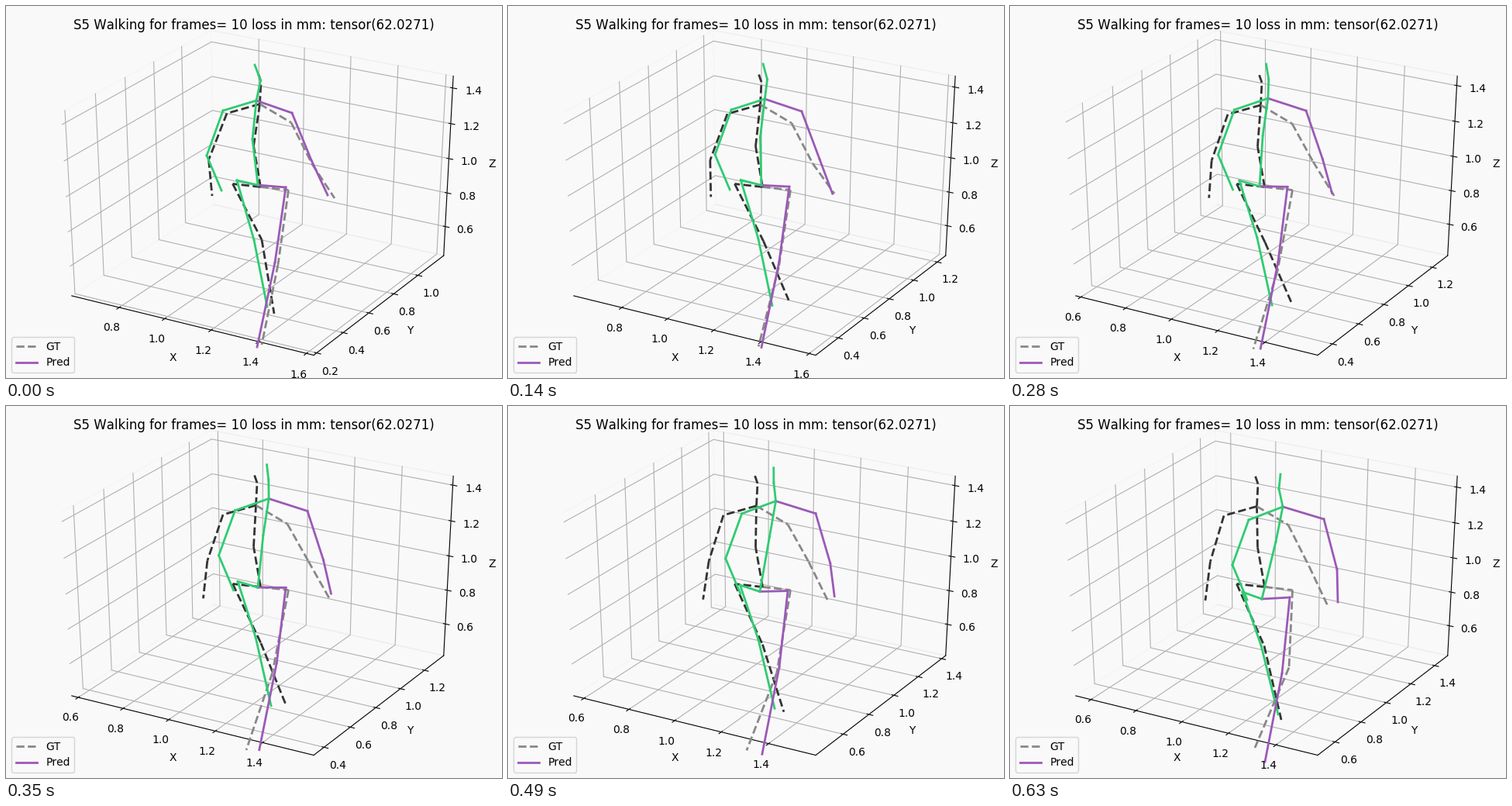
Write a matplotlib script that moves like this. It is 640 px wide and 480 px high and loops after 700 ms.

```python
import numpy as np
import matplotlib.pyplot as plt
from matplotlib.animation import FuncAnimation

W, H, FRAMES = 640, 480, 10
BG = "#f9f9f9"
DARK, GREY, GREEN, PURPLE = "#333333", "#888888", "#2ecc71", "#9b59b6"
TITLE = "S5 Walking for frames= 10 loss in mm: tensor(62.0271)"

# Camera: azimuth -60, elevation 30, distance 10, around a unit cube
AZ, EL, DIST = np.radians(-60), np.radians(30), 10
RIGHT = np.array([-np.sin(AZ), np.cos(AZ), 0])
NEAR = np.array([np.cos(AZ) * np.cos(EL), np.sin(AZ) * np.cos(EL), np.sin(EL)])
UP = np.cross(NEAR, RIGHT)

E = 0.5 + 1 / 48                      # half size of the drawn box
BACK = np.array([-E, E, -E])          # corner shared by the three panes
EDGES = np.array([[0, -E, -E], [E, 0, -E], [E, E, 0]])
TICK_DIR = (1, 0, 0)
PAD_UNIT = 48 / (72 * (6.4 + 4.8)) / 12
TICK_PAD, NAME_PAD = 11.5 * PAD_UNIT, 25 * PAD_UNIT

# Each chain runs from parent to child; 0 and 1 pick the side's colour
CHAINS = [
    ("root hip_r knee_r foot_r", 0),
    ("root hip_l knee_l foot_l", 1),
    ("root spine chest neck head", 0),
    ("chest arm_l elbow_l hand_l", 1),
    ("chest arm_r elbow_r hand_r", 0),
]

# First pose relative to the pelvis, in pixels, and how far joints drift
# over the loop; unlisted joints lean with the upper body
TRUE_START = dict(
    root=(0, 0), hip_r=(-36, -4), knee_r=(1.5, 68), foot_r=(17.5, 163.5),
    hip_l=(36, 4), knee_l=(22.5, 100), foot_l=(1.5, 203.5),
    spine=(-9, -53), chest=(-1, -107), neck=(0.5, -136), head=(-4, -149),
    arm_l=(39.5, -83), elbow_l=(66.5, -29.5), hand_l=(95.5, 14.5),
    arm_r=(-43.5, -95), elbow_r=(-67, -35), hand_r=(-62.5, 11.5))
TRUE_LEAN = (-9, 3)
TRUE_DRIFT = dict(
    root=(0, 0), hip_r=(0, 0), hip_l=(0, 0), spine=(0, 2),
    knee_r=(-2, 8), foot_r=(4, 8), knee_l=(9, 4), foot_l=(-14, 4),
    elbow_r=(-3, 2), hand_r=(-14, 6), hand_l=(-13, 12))

PRED_START = dict(
    root=(0, 0), hip_r=(-27, -6), knee_r=(-5, 71), foot_r=(12, 157),
    hip_l=(36, 3), knee_l=(22, 100), foot_l=(-1, 209),
    spine=(-7, -59), chest=(-2, -109), neck=(3.5, -135), head=(-4, -155),
    arm_l=(44, -93), elbow_l=(69, -32), hand_l=(90, 13),
    arm_r=(-45, -96), elbow_r=(-66, -38), hand_r=(-47, 7))
PRED_LEAN = (28, -6)
PRED_DRIFT = dict(
    root=(0, 0), hip_r=(2, -3), hip_l=(0, -5), knee_r=(4, -11),
    foot_r=(9, -8), knee_l=(4, -4), foot_l=(5, 1), spine=(25, -15),
    chest=(29, -10), neck=(18.5, -7), arm_l=(36, -10), hand_l=(8, -9))

# Extra swing out and back, peaking early or late in the loop
EARLY, LATE = 0.6, 1.6
SWING = dict(
    foot_r=(EARLY, 16, -20), hand_l=(EARLY, 0, -9),
    knee_l=(LATE, -13, 9), foot_l=(LATE, -13, 5),
    elbow_l=(LATE, 0, -6), hand_r=(LATE, -4, 0))


def view_center(i):
    return (1.109 - 0.0007 * i**2,
            0.699 + 0.0245 * i + 0.00089 * i**2,
            0.937 + 0.008 * np.cos(2 * np.pi * i / 11))


def pose(root, start, drift, lean, u):
    return {name: root + np.array(p) + u * np.array(drift.get(name, lean))
            for name, p in start.items()}


def true_pose(u):
    joints = pose((328.5, 233.5), TRUE_START, TRUE_DRIFT, TRUE_LEAN, u)
    for name, (peak, dx, dy) in SWING.items():
        joints[name] += np.sin(np.pi * u**peak) * np.array([dx, dy])
    return joints


def pred_pose(i, u):
    wobble = 3 * np.sin(np.pi * u) * np.cos(np.pi * i / 2)
    root = (325 - wobble, 231 + 18 * u**3)
    return pose(root, PRED_START, PRED_DRIFT, PRED_LEAN, u)


def project(points):
    """Box coordinates around the centre to stage pixels."""
    p = np.atleast_2d(points)
    w = DIST - p @ NEAR
    x = (p @ RIGHT / w + 0.095) / 0.185 * W
    y = H - (p @ UP / w + 0.095) / 0.185 * H
    return x, y


def moved(point, axis, value):
    p = np.array(point, float)
    p[axis] = value
    return p


def line3d(points, **style):
    ax.plot(*project(points), **style)


def text3d(point, s, va):
    x, y = project(point)
    ax.text(x[0], y[0], s, fontsize=10, ha="center", va=va)


def draw_panes():
    left = [(-E, -E, -E), (-E, E, -E), (-E, E, E), (-E, -E, E)]
    rear = [(-E, E, -E), (E, E, -E), (E, E, E), (-E, E, E)]
    floor = [(-E, -E, -E), (E, -E, -E), (E, E, -E), (-E, E, -E)]
    for pane, shade in ((left, "0.95"), (rear, "0.9"), (floor, "0.925")):
        line3d(pane, color=shade, alpha=0.5, lw=1)


def draw_axis(k, center):
    edge = EDGES[k]
    out = np.sign(edge)
    line3d([moved(edge, k, -E), moved(edge, k, E)], color="k", lw=0.8)
    text3d(edge + out * NAME_PAD, "XYZ"[k], "center")

    first = np.ceil((center - 0.5) / 0.2)
    last = np.floor((center + 0.5) / 0.2)
    ticks = np.arange(first, last + 1) * 0.2
    for v in ticks:
        p = moved(BACK, k, v - center)
        a, b = (k + 1) % 3, (k + 2) % 3
        line3d([moved(p, a, -p[a]), p, moved(p, b, -p[b])],
               color="#b0b0b0", lw=0.8)
    d = TICK_DIR[k]
    step = np.eye(3)[d] * out[d] / 12
    for v in ticks:
        p = moved(edge, k, v - center)
        line3d([p - 0.1 * step, p + 0.2 * step], color="k", lw=0.8)
        text3d(p + out * TICK_PAD, f"{v:.1f}", "top")


def draw_body(joints, colors, style):
    for chain, side in CHAINS:
        names = chain.split()
        for a, b in zip(names, names[1:]):
            ax.plot(*zip(joints[a], joints[b]), style,
                    color=colors[side], lw=2)


def draw(i):
    u = i / (FRAMES - 1)
    ax.clear()
    ax.set(xlim=(0, W), ylim=(H, 0))
    ax.axis("off")
    draw_panes()
    for k, center in enumerate(view_center(i)):
        draw_axis(k, center)
    draw_body(true_pose(u), (DARK, GREY), "--")
    draw_body(pred_pose(i, u), (GREEN, PURPLE), "-")
    ax.text(W / 2, 30.07, TITLE, fontsize=12, ha="center", va="baseline")
    handles = [plt.Line2D([], [], color=GREY, lw=2, ls="--", label="GT"),
               plt.Line2D([], [], color=PURPLE, lw=2, label="Pred")]
    ax.legend(handles=handles, loc="lower left", fontsize=10, facecolor=BG)
    return ax.get_children()


plt.rcParams.update({"font.family": "DejaVu Sans", "text.kerning_factor": 6})
fig = plt.figure(figsize=(W / 100, H / 100), dpi=100, facecolor=BG)
ax = fig.add_axes([0, 0, 1, 1])
anim = FuncAnimation(fig, draw, frames=FRAMES, interval=70,
                     init_func=lambda: draw(0), repeat=True, repeat_delay=0)
plt.show()
```
